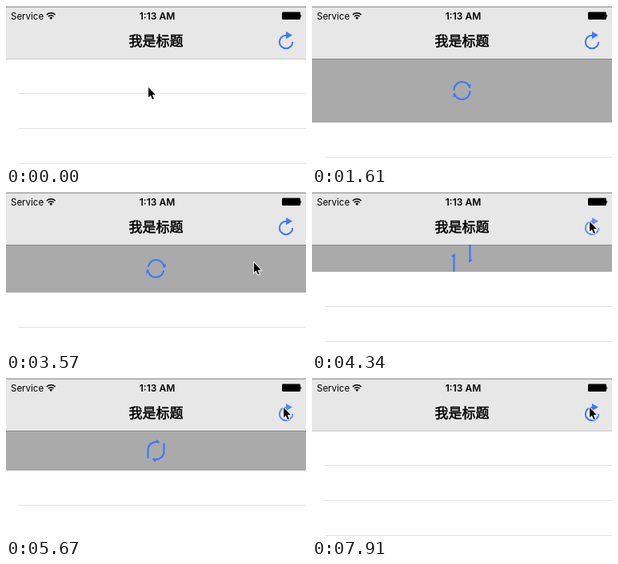
An HTML page that plays this animation: 375 px wide and 198 px high, repeating every 8.47 s.

```html
<!DOCTYPE html>
<html lang="zh">
<head>
<meta charset="utf-8">
<style>
  html, body { margin: 0; width: 100%; height: 100%; overflow: hidden; background: #fff; }
  svg { display: block; width: 375px; height: 198px; }
  text { font-family: Inter, Roboto, sans-serif; font-size: 11.5px; }
  .time { font-size: 12px; font-weight: 600; }
  .title {
    font: 400 17px "Noto Sans CJK SC", "Noto Sans CJK", sans-serif;
    stroke: #000; stroke-width: .55;
  }
  .line { fill: none; stroke: #3f78f8; stroke-width: 2.2; stroke-linecap: round; stroke-linejoin: round; }
</style>
</head>
<body>
<svg viewBox="0 0 375 198">
  <rect width="375" height="198" fill="#aaa"/>
  <path id="curve" class="line"/>
  <g id="rows">
    <rect y="66" width="375" height="198" fill="#fff"/>
    <path d="M16 109.5H375M16 153.5H375M16 197.5H375" stroke="#e2e2e4"/>
  </g>

  <rect width="375" height="66" fill="#e7e7e7"/>
  <rect width="375" height="1" fill="#c6c6c6"/>
  <rect y="1" width="375" height="1" fill="#a8a8a8"/>
  <rect y="66" width="375" height="1" fill="#000" fill-opacity=".2"/>
  <text x="6" y="17">Service</text>
  <g transform="translate(56.2 16.3)" fill="none" stroke="#000" stroke-width="1.4">
    <path d="M-5.4 -5.4A7.8 7.8 0 0 1 5.4 -5.4M-3.4 -3.1A4.8 4.8 0 0 1 3.4 -3.1"/>
    <path d="M-1.9 -1.5A2.6 2.6 0 0 1 1.9 -1.5L0 .6Z" fill="#000" stroke="none"/>
  </g>
  <text class="time" x="189" y="17" text-anchor="middle">1:13 AM</text>
  <rect x="345" y="7.5" width="23" height="9.6" rx="1.4"/>
  <path d="M368.4 10.4q2 1.9 0 3.8z"/>
  <text class="title" x="187.5" y="50" text-anchor="middle">我是标题</text>
  <g id="button">
    <path class="line" style="stroke-width:2;stroke-linecap:butt" d="M350 36.8A8.2 8.2 0 1 0 358.2 45"/>
    <path d="M350 32L358 36.6L350 41.2Z" fill="#3f78f8"/>
  </g>
  <path id="cursor" d="M.6 .6V13L3.4 10.4L5.5 15.6L7.4 14.8L5.3 9.8H9.4Z"
        stroke="#fff" stroke-width="1.8" style="paint-order:stroke"/>
</svg>
<script>
const LOOP = 8470, STEP = 70;
const HOLD = 60;                // header height while refreshing
const MID_X = 187.5, RADIUS = 10, SPACE = 1, LINE = 30, HALF_VIEW = 75;
const SETTLE = 300;             // duration of header animations
const RELEASE = 2053, CLOSE_1 = 4202, OPEN = 5447, CLOSE_2 = 7605;
const DRAG = [[390, 0], [770, 22], [1190, 57], [1610, 80], [1890, 74]];

const $ = id => document.getElementById(id);
const clamp = v => Math.max(0, Math.min(1, v));
const mix = (a, b, k) => a + (b - a) * k;
const ease = (t, start, duration) => {
  const k = clamp((t - start) / duration);
  return k * k * (3 - 2 * k);
};

// Smooth curve through the drag points, flat at both ends.
function dragHeight(t) {
  const last = DRAG.length - 1;
  if (t <= DRAG[0][0]) return 0;
  if (t >= DRAG[last][0]) return DRAG[last][1];
  const i = DRAG.findIndex(p => p[0] > t) - 1;
  const slope = j => j < 1 || j >= last ? 0
    : (DRAG[j + 1][1] - DRAG[j - 1][1]) / (DRAG[j + 1][0] - DRAG[j - 1][0]);
  const [t0, a] = DRAG[i], [t1, b] = DRAG[i + 1];
  const span = t1 - t0, k = (t - t0) / span;
  return mix(a, b, k * k * (3 - 2 * k))
    + span * k * (1 - k) * (slope(i) * (1 - k) - slope(i + 1) * k);
}

function headerHeight(t) {
  if (t < RELEASE) return dragHeight(t);
  if (t < CLOSE_1) return mix(dragHeight(RELEASE), HOLD, ease(t, RELEASE, SETTLE));
  if (t < OPEN) return HOLD * (1 - ease(t, CLOSE_1, SETTLE));
  return HOLD * (ease(t, OPEN, SETTLE) - ease(t, CLOSE_2, SETTLE));
}

// One hooked line relative to the header centre; side -1 is left, 1 is right.
function hook(side, progress) {
  const bend = clamp(progress * 2 - 1);
  const away = clamp(1 - progress * 2) * (HALF_VIEW - LINE);
  const x = side * RADIUS;
  const base = side * (SPACE - away);
  const angle = Math.PI * 0.9 * bend;
  const endX = x * Math.cos(angle), endY = base + x * Math.sin(angle);
  const barb = Math.PI / 3 - angle;
  return `M${x} ${base - side * LINE * (1 - bend)}V${base}`
    + `A${RADIUS} ${RADIUS} 0 0 1 ${endX} ${endY}`
    + `l${side * 3 * Math.cos(barb)} ${-side * 3 * Math.sin(barb)}`;
}

function spin(t) {
  const start = t < CLOSE_1 ? RELEASE : OPEN + SETTLE;
  const end = t < CLOSE_1 ? CLOSE_1 : CLOSE_2;
  return t > start && t < end ? (t - start) * 0.72 : 0;
}

function cursorPosition(t, height) {
  if (t < 70) return [177.5, 101.5];
  if (t < 140) return [179, 98];
  if (t < 2950) {
    const pull = height / 0.55 / (1 - height / 603);   // rubber-band resistance
    const y = t < 1890 ? 96 + 16 * ease(t, 300, 200) + pull : 260;
    return [179 + 2 * ease(t, 300, 400), y];
  }
  const k = ease(t, 2950, 900);
  return [mix(185, 346.5, k), mix(260, 36.5, k)];
}

function buttonOpacity(t) {
  if (t >= 5320 && t < 5460) return 0.35;
  if (t >= 5460 && t < 5930) return mix(0.7, 1, (t - 5460) / 470);
  const closing = start => t >= start && t < start + SETTLE;
  return closing(CLOSE_1) || closing(CLOSE_2) ? 0.75 : 1;
}

function draw(now) {
  const t = Math.floor(now % LOOP / STEP) * STEP;
  const height = headerHeight(t), progress = clamp(height / HOLD);
  $("rows").setAttribute("transform", `translate(0 ${Math.round(height)})`);
  $("curve").setAttribute("d", hook(-1, progress) + hook(1, progress));
  $("curve").setAttribute("transform", `translate(${MID_X} ${66 + height / 2}) rotate(${spin(t)})`);
  $("button").setAttribute("opacity", buttonOpacity(t));
  $("cursor").setAttribute("transform", `translate(${cursorPosition(t, height)})`);
}

const origin = performance.now();
function tick() {
  draw(performance.now() - origin);
  requestAnimationFrame(tick);
}
tick();
</script>
</body>
</html>
```
